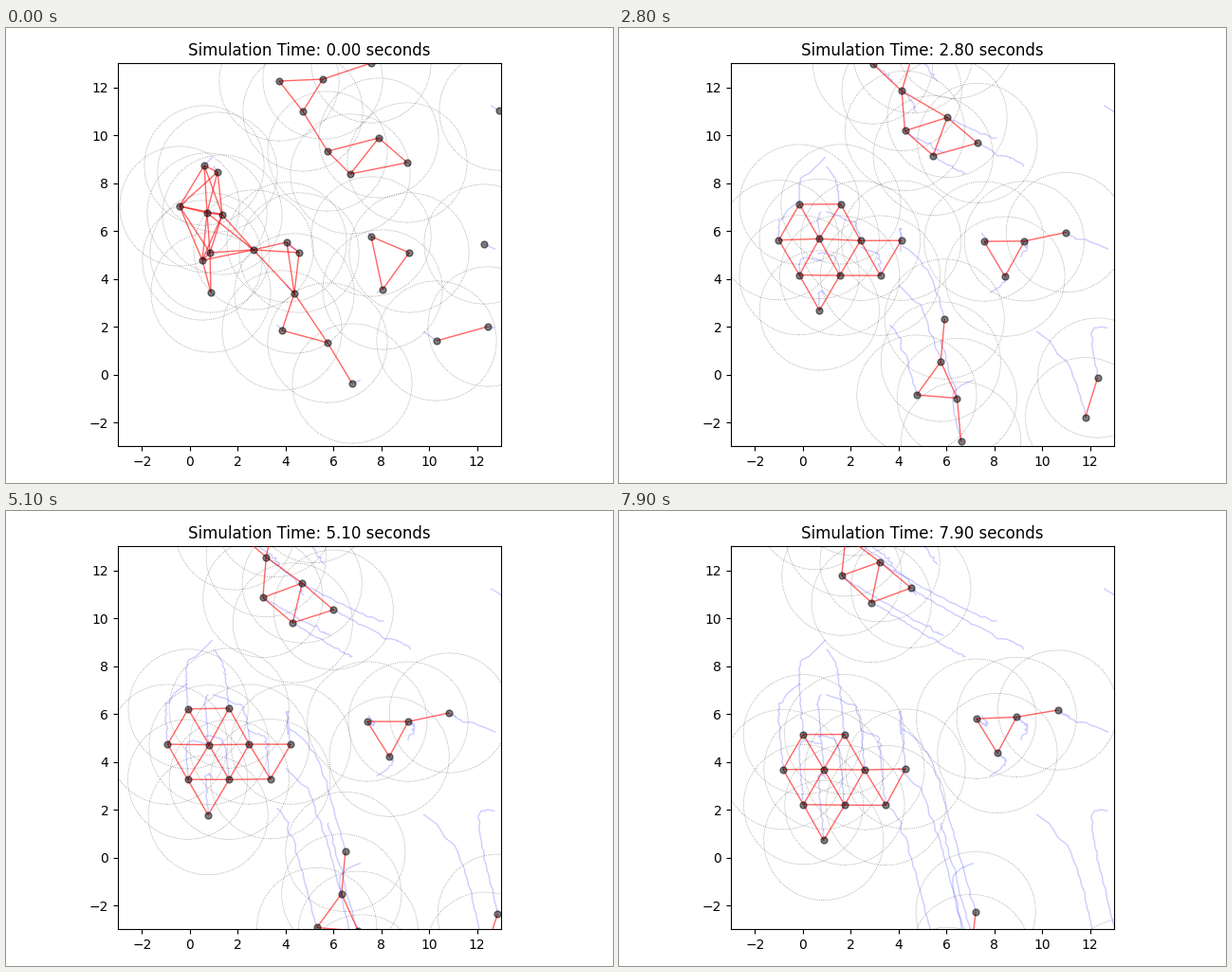
Animation, 640 px wide and 480 px high, one loop 8 s. Source, as a matplotlib script:

```python
import matplotlib.pyplot as plt
import numpy as np
from matplotlib.animation import FuncAnimation
from matplotlib.collections import LineCollection
from matplotlib.patches import Circle

W, H, DPI = 640, 480, 100
LEFT, BOTTOM, SIDE = 118.03, 441.28, 403.94   # square axes, in pixels
LOW, HIGH = -3, 13
UNIT = SIDE / (HIGH - LOW)
DT, FRAMES, LEAD = 0.1, 80, 2                 # LEAD: steps before the clock starts
REACH, SPACING = 2.5, 43                      # link range (data), lattice pitch (pixels)

times = (np.arange(FRAMES + LEAD) - LEAD) * DT
rng = np.random.default_rng(7)


def wander():
    """Smooth random meander that calms down with time and is zero at t = 0."""
    n = rng.normal(size=(len(times) + 3, 2))
    n = (n[:-3] + 2 * n[1:-2] + 2 * n[2:-1] + n[3:]) / 3.2
    size = (0.4 + 1.6 * np.exp(-np.maximum(times, 0))) * np.minimum(1, 3 * abs(times))
    return n * size[:, None]


def flock(origin, drift, tilt, agents, rate=1.8):
    """Agents (x, y, col, row) relax from their start into a drifting hexagonal lattice."""
    a = np.radians([tilt, tilt + 60])
    basis = SPACING * np.stack([np.cos(a), np.sin(a)], axis=1)
    t = times[:, None]
    paths = []
    for x, y, col, row in agents:
        slot = np.array(origin) + np.array([col, row]) @ basis
        offset = np.array([x, y]) - slot
        paths.append(slot + np.array(drift) * t + offset * np.exp(-rate * t) + wander())
    return paths


def to_data(px):
    return np.stack([LOW + (px[..., 0] - LEFT) / UNIT,
                     LOW + (BOTTOM - px[..., 1]) / UNIT], axis=-1)


west = flock((209, 196.5), (0.9, 9.7), 0, [
    (209, 145, 0, -1), (223, 152, 1, -1),
    (183, 188, -1, 0), (212, 195, 0, 0), (228, 197, 1, 0), (296, 226, 2, 0),
    (207, 245, -1, 1), (215, 237, 0, 1), (261, 234, 1, 1),
    (216, 279, -1, 2)])
south = flock((296, 323.5), (6.3, 22.6), 6, [
    (291, 319, 0, 0), (339, 332, 1, 0), (304, 280, 1, -1),
    (309, 237, 1.6, -2.2), (365, 375, 0.6, 1.2)])
north = flock((336.7, 132), (-13, -8), -20, [
    (339, 130, 0, 0), (393, 116, 1, 0), (363, 154, 0, 1), (423, 142, 1, 1),
    (313, 88, 1, -1), (288, 56, 1, -2), (334, 54, 2, -2), (385, 37, 3, -2)], rate=0.4)
east = flock((389.6, 228.5), (-1.6, -1.2), -1.3, [
    (385, 220, 0, 0), (425, 237, 1, 0), (397, 276, 0, 1), (504, 228, 2.1, -0.2)])
pair = flock((476, 342), (5.7, 24.3), -72, [(454, 330, 0, 0), (508, 315, 1, 0)])
loner = flock((520, 87), (39, 32), 0, [(520, 87, 0, 0)])

tracks = to_data(np.array(west + south + north + east + pair + loner))
first, second = np.triu_indices(len(tracks), 1)

fig = plt.figure(figsize=(W / DPI, H / DPI), dpi=DPI)
ax = fig.add_axes([LEFT / W, 1 - BOTTOM / H, SIDE / W, SIDE / H])
ax.set(xlim=(LOW, HIGH), ylim=(LOW, HIGH))
ax.set_xticks(range(-2, 13, 2))
ax.set_yticks(range(-2, 13, 2))
title = ax.set_title("")

rings = [ax.add_patch(Circle((0, 0), REACH, fill=False, ec="black", lw=0.5,
                             ls=":", alpha=0.5)) for _ in tracks]
trails = ax.add_collection(LineCollection([], colors="blue", lw=1, alpha=0.2, zorder=2),
                           autolim=False)
links = ax.add_collection(LineCollection([], colors="red", lw=1, alpha=0.6, zorder=3),
                          autolim=False)
dots, = ax.plot([], [], "ko", ms=5, alpha=0.5, zorder=4)


def draw(frame):
    now = frame + LEAD
    pos = tracks[:, now]
    for ring, p in zip(rings, pos):
        ring.center = p
    trails.set_segments(list(tracks[:, :now + 1]))
    near = np.linalg.norm(pos[first] - pos[second], axis=1) < REACH
    links.set_segments(list(np.stack([pos[first[near]], pos[second[near]]], axis=1)))
    dots.set_data(pos[:, 0], pos[:, 1])
    title.set_text(f"Simulation Time: {frame * DT:.2f} seconds")
    return [*rings, trails, links, dots, title]


anim = FuncAnimation(fig, draw, frames=FRAMES, interval=100, repeat=True, repeat_delay=0)
plt.show()
```
